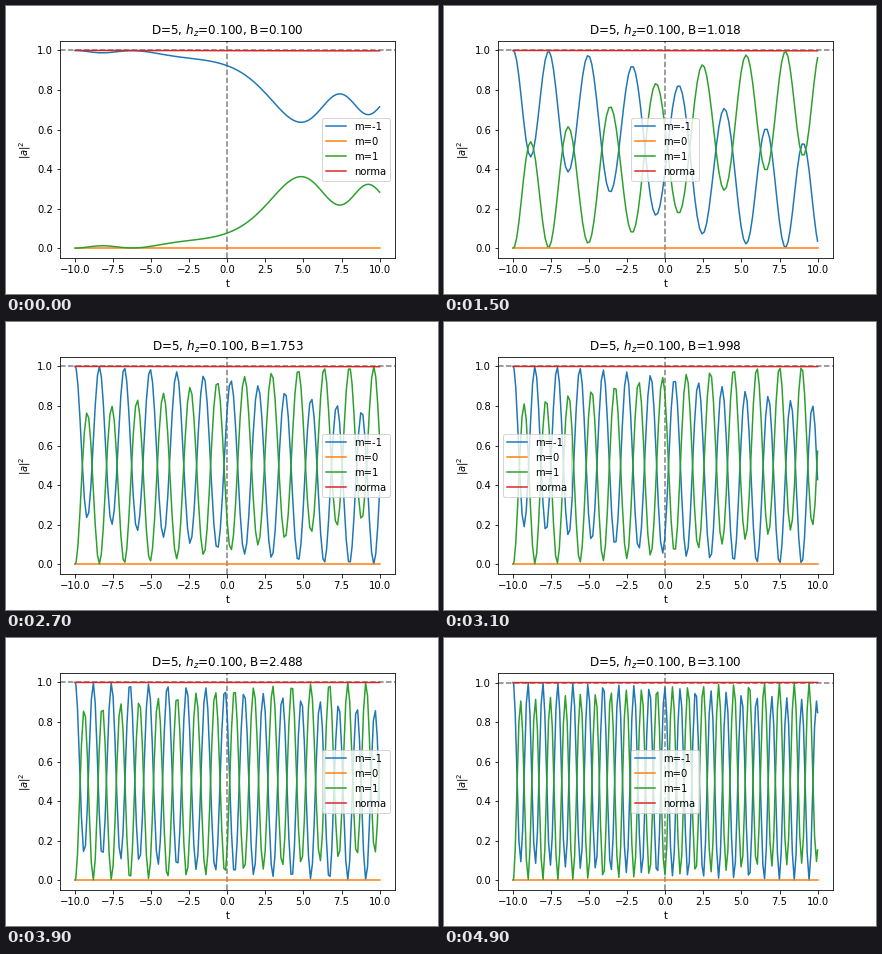
Animation of 432x288 px, one loop 5000 ms. Source, as a matplotlib script:

```python
import numpy as np
import matplotlib.pyplot as plt
from matplotlib.animation import FuncAnimation

FRAMES, INTERVAL = 50, 100
D, HZ = 5, 0.1
T_START, T_END = -10.0, 10.0
RTOL, ATOL = 1e-3, 1e-6
FIELDS = np.linspace(0.1, 3.1, FRAMES)

# Dormand-Prince 5(4) coefficients
NODES = [0, 1/5, 3/10, 4/5, 8/9, 1]
STAGES = [
    np.array(row) for row in (
        [],
        [1/5],
        [3/40, 9/40],
        [44/45, -56/15, 32/9],
        [19372/6561, -25360/2187, 64448/6561, -212/729],
        [9017/3168, -355/33, 46732/5247, 49/176, -5103/18656],
    )
]
WEIGHTS = np.array([35/384, 0, 500/1113, 125/192, -2187/6784, 11/84])
ERRORS = np.array([-71/57600, 0, 71/16695, -71/1920,
                   17253/339200, -22/525, 1/40])


def rms(v):
    return np.linalg.norm(v) / np.sqrt(v.size)


def first_step(rhs, t, y, slope):
    scale = ATOL + np.abs(y) * RTOL
    d0, d1 = rms(y / scale), rms(slope / scale)
    trial = 0.01 * d0 / d1
    d2 = rms((rhs(t + trial, y + trial * slope) - slope) / scale) / trial
    return min(100 * trial, (0.01 / max(d1, d2)) ** 0.2)


def integrate(rhs, y):
    """Adaptive Runge-Kutta; returns every accepted step."""
    t, slope = T_START, rhs(T_START, y)
    h = first_step(rhs, t, y, slope)
    times, states = [t], [y]
    while t < T_END:
        rejected = False
        while True:
            t_new = min(t + h, T_END)
            h = t_new - t
            k = np.zeros((7, y.size), complex)
            k[0] = slope
            for s in range(1, 6):
                k[s] = rhs(t + NODES[s] * h, y + h * (STAGES[s] @ k[:s]))
            y_new = y + h * (WEIGHTS @ k[:6])
            k[6] = rhs(t_new, y_new)
            scale = ATOL + np.maximum(np.abs(y), np.abs(y_new)) * RTOL
            error = max(rms(h * (ERRORS @ k) / scale), 1e-12)
            factor = 0.9 * error ** -0.2
            if error < 1:
                h *= min(1 if rejected else 10, factor)
                break
            h *= max(0.2, factor)
            rejected = True
        t, y, slope = t_new, y_new, k[6]
        times.append(t)
        states.append(y)
    return np.array(times), np.array(states)


def spin_populations(b):
    """Spin-1 level populations (m = -1, 0, 1) during a linear field sweep."""
    static = np.array([[D, 0, b], [0, 0, 0], [b, 0, D]], complex)
    sweep = HZ * np.diag([-1, 0, 1])
    times, states = integrate(lambda t, y: -1j * ((static + t * sweep) @ y),
                              np.array([1, 0, 0], complex))
    return times, np.abs(states) ** 2


plt.rcParams["font.family"] = "DejaVu Sans"
fig, ax = plt.subplots(figsize=(6, 4), dpi=72)
fig.subplots_adjust(bottom=0.125)


def draw(frame):
    b = FIELDS[frame]
    times, levels = spin_populations(b)
    ax.clear()
    ax.axhline(1, color="gray", linestyle="--")
    ax.axvline(0, color="gray", linestyle="--")
    for m, level in zip((-1, 0, 1), levels.T):
        ax.plot(times, level, label=f"m={m}")
    ax.plot(times, levels.sum(axis=1), label="norma")
    ax.set_xlabel("t")
    ax.set_ylabel(r"$|a|^2$")
    ax.set_title(rf"D={D}, $h_z$={HZ:.3f}, B={b:.3f}")
    ax.legend(loc="best")
    return ax.lines


anim = FuncAnimation(fig, draw, frames=FRAMES, interval=INTERVAL,
                     init_func=lambda: [], repeat=True, repeat_delay=0)
plt.show()
```
